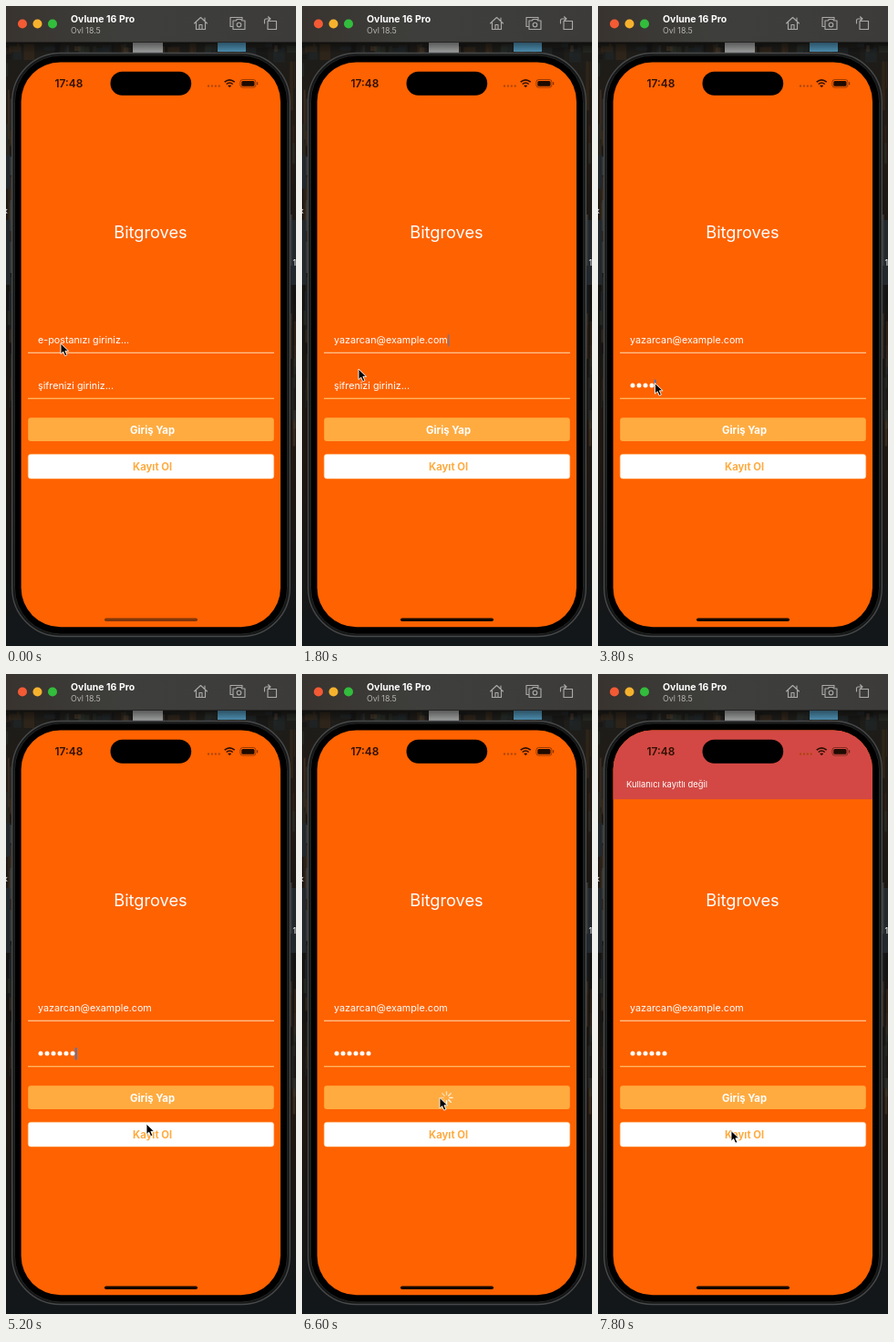
These frames come from a looping animation (318x700 px, 8 s). An HTML page:

```html
<!DOCTYPE html>
<html lang="tr">
<head>
<meta charset="utf-8">
<title>Giriş</title>
<style>
  html, body { margin: 0; width: 100%; height: 100%; overflow: hidden; background: #14110f; }
  svg { display: block; width: 100vw; height: 100vh; }
  text { font-family: Inter, Roboto, sans-serif; fill: #fff; }
  .mid { text-anchor: middle; }
  .bold { font-weight: 700; }
  .input { font-size: 10.75px; }
  .button { font-size: 11.3px; font-weight: 700; text-anchor: middle; }
  .tool { fill: none; stroke: #aaa9a7; stroke-width: 1.15; stroke-linejoin: round; stroke-linecap: round; }
</style>
</head>
<body>
<svg viewBox="0 0 318 700" preserveAspectRatio="none">
  <defs>
    <linearGradient id="wood" x2="0" y2="1">
      <stop offset="0" stop-color="#1b1e1c"/>
      <stop offset=".2" stop-color="#221a14"/>
      <stop offset=".45" stop-color="#151412"/>
      <stop offset=".7" stop-color="#1f1711"/>
      <stop offset="1" stop-color="#12171a"/>
    </linearGradient>
    <linearGradient id="shade" x2="0" y2="1">
      <stop offset="0" stop-color="#000" stop-opacity=".45"/>
      <stop offset="1" stop-color="#000" stop-opacity="0"/>
    </linearGradient>
    <linearGradient id="bar">
      <stop offset="0" stop-color="#38332f"/>
      <stop offset=".4" stop-color="#3e3f3c"/>
      <stop offset="1" stop-color="#3c3b3a"/>
    </linearGradient>
    <clipPath id="screen"><rect x="16.600" y="61.500" width="284.400" height="617.800" rx="43"/></clipPath>
  </defs>

  <!-- desktop -->
  <rect width="318" height="700" fill="url(#wood)"/>
  <g id="forest"></g>
  <rect x="139" y="40" width="33" height="12" fill="#a2a3a3"/>
  <rect x="232" y="40" width="31" height="10" fill="#5095b8"/>
  <rect y="40" width="318" height="12" fill="url(#shade)"/>
  <path d="M0 163h5v37H0zM0 234h5v71H0zM312 234h6v71h-6z" fill="#23282c"/>
  <text x="-3" y="227" font-size="9">x</text>
  <text x="314.500" y="284" font-size="9">1</text>

  <!-- window bar -->
  <rect width="318" height="40" fill="url(#bar)"/>
  <rect y="39.300" width="318" height=".7" fill="#1d1b1a"/>
  <circle cx="18" cy="19.500" r="5" fill="#f45a34"/>
  <circle cx="34.500" cy="19.500" r="5" fill="#f6b22d"/>
  <circle cx="51" cy="19.500" r="5" fill="#32bd3c"/>
  <text class="bold" x="71" y="18" font-size="10.500">Ovlune 16 Pro</text>
  <text x="71" y="29.500" font-size="8.800" style="fill:#b5b3b1">Ovl 18.5</text>
  <g class="tool">
    <path d="M206.500 19l7-6.500 7 6.500M208.500 18v7.500h10V18M212 25v-4.500h3V25M218 13v3"/>
    <path d="M248.500 22.500h-2.500v-10h13v2"/>
    <path d="M249 16h3l1.500-1.500h4L259 16h3v9.500h-13z"/>
    <circle cx="255.500" cy="20.500" r="2.300"/>
    <path d="M287 16.500h9.500v9H287zM283.500 19v-3q0-2 2-2h4M287.500 11.800l2.500 2.200-2.500 2.200"/>
  </g>

  <!-- phone -->
  <path d="M5.500 165v20M5.500 212v34M5.500 258v34M312.500 228v56" stroke="#3b3c3d" stroke-width="2"/>
  <rect x="6.700" y="51.500" width="304.600" height="638" rx="53" fill="#151616" stroke="#474849" stroke-width="1.400"/>
  <rect x="9.500" y="54" width="299" height="633" rx="50.500" fill="#000" stroke="#232425"/>
  <g clip-path="url(#screen)">
    <rect x="16" y="61" width="286" height="619" fill="#ff6200"/>
    <text class="mid" x="158.500" y="254" font-size="18.200">Bitgroves</text>
    <text id="mail" class="input" x="35" y="369"></text>
    <text id="hint" class="input" x="35" y="419">şifrenizi giriniz...</text>
    <g id="dots" fill="#fff"></g>
    <rect id="caret" width="1.600" height="13.500" rx=".8" fill="#2c7be0"/>
    <path d="M24 379.300h270" stroke="#ffdcb8" stroke-width="1.100"/>
    <path d="M24 429.300h270" stroke="#ffd285" stroke-width="1.100"/>
    <rect id="login" x="24.200" y="450.300" width="269.600" height="25.800" rx="3" fill="#ffab40"/>
    <text id="loginText" class="button" x="160.500" y="467.500">Giriş Yap</text>
    <g id="spinner" stroke="#fff" stroke-width="1.400" stroke-linecap="round"></g>
    <rect x="24.300" y="490.300" width="269.400" height="26.600" rx="3" fill="#fff" stroke="#ffcf96" stroke-width=".6"/>
    <text class="button" x="160.500" y="508" style="fill:#ffab40">Kayıt Ol</text>
    <g id="banner">
      <rect x="16" y="61" width="286" height="76" fill="#d34844"/>
      <text x="31" y="124" font-size="9.400">Kullanıcı kayıtlı değil</text>
    </g>
    <rect id="home" x="108" y="669.500" width="102" height="3.400" rx="1.700"/>
  </g>

  <!-- status row -->
  <rect x="114.500" y="71.700" width="88.700" height="26" rx="13"/>
  <text x="53.500" y="89" font-size="11.900" font-weight="600" style="fill:#2d1000">17:48</text>
  <path d="M221 87.500h14" stroke="#a84509" stroke-width="1.800" stroke-dasharray="2 1.900"/>
  <g fill="none" stroke="#2d1000" stroke-width="1.600">
    <path d="M239.700 83.200q5.500-4.800 11 0M241.700 85.500q3.500-3 7 0"/>
    <path d="M243.700 87l1.500 1.800 1.500-1.800z" stroke-width=".8" fill="#2d1000"/>
    <rect x="256.900" y="80.500" width="17" height="8.600" rx="2.600" stroke-width=".8" opacity=".6"/>
    <path d="M275.600 83.300v3" stroke-width="1.200" opacity=".6"/>
  </g>
  <rect x="258.300" y="81.900" width="14.200" height="5.800" rx="1.500" fill="#1f0b00"/>

  <path id="pointer" d="M0 0v11.600l2.700-2.500 2 4.600 2.200-1-2-4.400h3.700z" fill="#000" stroke="#fff" stroke-width=".9" stroke-linejoin="round"/>
</svg>
<script>
const LOOP = 8000, STEP = 200;
const MAIL = 'yazarcan@example.com';
const el = id => document.getElementById(id);
const clamp = (v, lo = 0, hi = 1) => Math.min(hi, Math.max(lo, v));
const span = (t, a, b) => clamp((t - a) / (b - a));
const ease = k => k * k * (3 - 2 * k);
const show = (node, on) => node.setAttribute('opacity', +on);
const repeat = (n, make) => Array.from({ length: n }, (_, i) => make(i)).join('');

const [mail, hint, dots, caret, login, loginText, spinner, banner, home, pointer] =
  ['mail', 'hint', 'dots', 'caret', 'login', 'loginText', 'spinner', 'banner', 'home', 'pointer'].map(el);

// Pointer stops: time, x, y
const stops = [
  [0, 60, 369], [1400, 60, 369], [1800, 62, 397], [2200, 62.5, 412.5],
  [4400, 62.5, 412.5], [5200, 154, 492], [5800, 151, 463.5],
  [6800, 151, 463.5], [7600, 146, 499.5], [8000, 146, 499.5]
];

dots.innerHTML = repeat(6, i => `<circle cx="${38 + i * 7}" cy="415" r="2.5"/>`);
spinner.innerHTML = repeat(8, i =>
  `<path d="M0-3.2v-3.4" transform="translate(158.5 463.5) rotate(${i * 45})"/>`);

// Blurred trunks and leaves around the phone
let seed = 7;
const rand = n => (seed = seed * 16807 % 2147483647) / 2147483647 * n;
const tones = ['#3a2a1c', '#2b3029', '#141516', '#4a3a29', '#20272a'];
const patch = (x, y, w, h) =>
  `<rect x="${x}" y="${y}" width="${w}" height="${h}" fill="${tones[Math.floor(rand(5))]}" opacity=".6"/>`;
el('forest').innerHTML =
  repeat(50, () => patch(rand(318), 40 + rand(6), 2 + rand(12), 4 + rand(14))) +
  repeat(40, i => patch(i % 2 ? 311 + rand(5) : rand(5), 60 + rand(400), 1 + rand(3), 10 + rand(50)));

function pointerAt(t) {
  const i = stops.findIndex(s => s[0] > t);
  const [t0, x0, y0] = stops[i - 1], [t1, x1, y1] = stops[i];
  const k = ease(span(t, t0, t1));
  return [x0 + (x1 - x0) * k, y0 + (y1 - y0) * k];
}

function drawFields(t) {
  const typed = Math.ceil(span(t, 400, 1400) * MAIL.length);
  mail.textContent = typed ? MAIL.slice(0, typed) : 'e-postanızı giriniz...';

  const count = t < 2900 ? 0 : clamp(Math.floor((t - 2900) / 300) + 1, 0, 6);
  [...dots.children].forEach((dot, i) => show(dot, i < count));
  show(hint, count === 0);

  const inMail = t < 2300;
  const x = inMail ? 35 + (typed && mail.getComputedTextLength()) : 34 + count * 7;
  caret.setAttribute('x', x);
  caret.setAttribute('y', inMail ? 359 : 408.5);
  const typing = (t >= 400 && t < 1600) || (t >= 2900 && t < 4800);
  const phase = (t % 1000) / 1000;
  const blink = phase < 0.5 ? 1 : phase < 0.7 ? 0.35 : phase < 0.9 ? 0.6 : 1;
  show(caret, t < 200 || t >= 6400 ? 0 : typing ? 1 : blink);
}

function drawLogin(t) {
  const pressed = t >= 6100 && t < 6400;
  const busy = t >= 6400 && t < 7200;
  show(login, pressed ? 0.2 : 1);
  show(loginText, !busy);
  loginText.style.fill = pressed ? '#f0690f' : '#fff';
  const head = Math.floor(t / 125) % 8;
  [...spinner.children].forEach((bar, i) =>
    show(bar, busy ? 1 - ((head - i + 8) % 8) * 0.1 : 0));
}

function draw(t) {
  drawFields(t);
  drawLogin(t);
  const drop = 1 - (1 - span(t, 7000, 7600)) ** 2;
  banner.setAttribute('transform', `translate(0 ${-77 * (1 - drop)})`);
  home.setAttribute('fill', t < 200 ? '#80360a' : t < 400 ? '#4a1f05' : '#140800');
  pointer.setAttribute('transform', `translate(${pointerAt(t)})`);
}

function tick() {
  const t = performance.now() % LOOP;
  draw(Math.floor(t / STEP) * STEP);
  requestAnimationFrame(tick);
}
tick();
</script>
</body>
</html>
```
